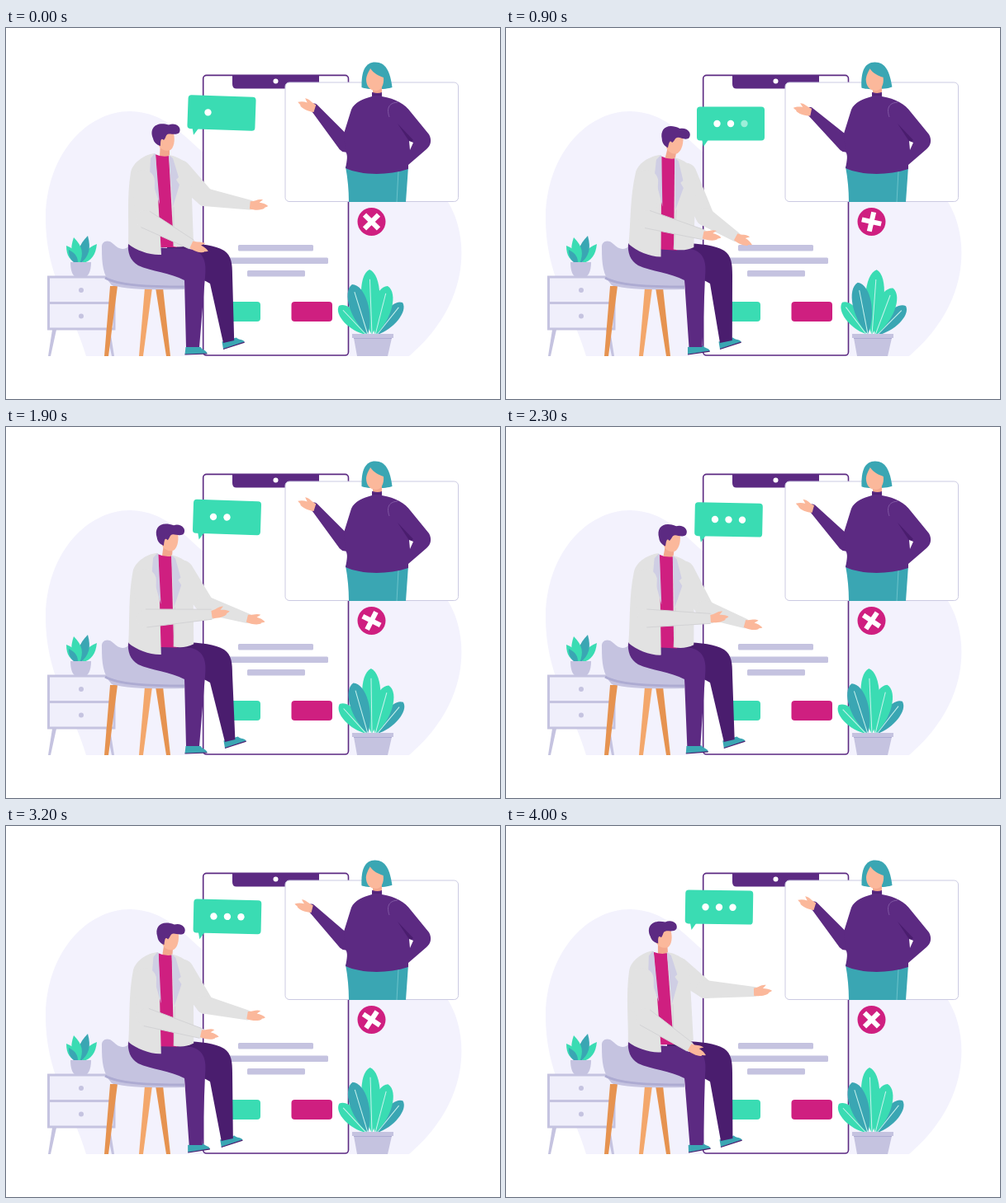
These frames come from a looping animation (598x450 px, 4.1 s). An HTML page with a canvas:

```html
<!DOCTYPE html>
<html lang="en">
<head>
<meta charset="utf-8">
<title>Online consultation</title>
<style>
html, body { margin: 0; width: 598px; height: 450px; overflow: hidden; background: #fff; }
canvas { display: block; }
</style>
</head>
<body>
<canvas id="stage" width="598" height="450"></canvas>
<script>
const ctx = document.getElementById('stage').getContext('2d');
const LOOP = 4100, STEP = 100;
const C = {
  purple: '#5c2a82', dark: '#4a1d6e', teal: '#3aa6b3', green: '#3adcb3', pink: '#cf1f80',
  lilac: '#c5c3e0', pale: '#f3f2fd', coat: '#e2e2e2', seam: '#d3d3d5', skin: '#fbb89b',
  wood: '#e69350', woodLight: '#f3a76b', white: '#fff'
};

// Poses at the key times; values in between follow a smooth curve.
const KEYS = [0, 900, 1500, 1900, 2700, 3600, 4000];
const TRACKS = {
  lean: [.23, 1, .83, .57, .88, .3, 0],
  bubbleX: [261, 272, 270.5, 267.5, 271, 264, 258],
  bubbleY: [103, 116, 113.5, 109.5, 114.5, 104.5, 98.5],
  bubbleTilt: [2, 0, 1.2, 1.8, .6, 1.7, .9],
  rightX: [315, 295, 302, 311, 305, 318, 320],
  rightY: [218, 264, 254, 238, 250, 217, 202],
  leftX: [242, 258, 266, 269, 264, 247, 239],
  leftY: [272, 256, 237, 226, 243, 269, 279],
  nearFoot: [0, 3.5, 2.5, 0, 3, 4, 4.5],
  farFoot: [2, -2, 1, 4, 1, -1, -1],
  wave: [0, -6.5, -3.5, 0, -5.5, -2.5, 0],
  sway: [-2, 4.3, 1.4, -.7, -3.4, 0, -2],
  cross: [45, 13, 45, 27, 42, 28, 45]
};

function slope(v, i) {
  const a = Math.max(i - 1, 0), b = Math.min(i + 1, KEYS.length - 1);
  return (v[b] - v[a]) / (KEYS[b] - KEYS[a]);
}
function sample(v, t) {
  let i = 0;
  while (i < KEYS.length - 2 && t >= KEYS[i + 1]) i++;
  const d = KEYS[i + 1] - KEYS[i], u = (t - KEYS[i]) / d, w = 1 - u;
  return v[i] * (1 + 2 * u) * w * w + slope(v, i) * d * u * w * w
    + v[i + 1] * u * u * (3 - 2 * u) - slope(v, i + 1) * d * u * u * w;
}
const fade = (t, from, to) => Math.min(1, Math.max(0, (t - from) / (to - from)));

function fill(d, color) {
  ctx.fillStyle = color;
  ctx.fill(new Path2D(d));
}
function line(d, color, width = 1) {
  ctx.strokeStyle = color;
  ctx.lineWidth = width;
  ctx.stroke(new Path2D(d));
}
function box(x, y, w, h, r, color, border, width) {
  ctx.beginPath();
  ctx.roundRect(x, y, w, h, r);
  ctx.fillStyle = color;
  ctx.fill();
  if (!border) return;
  ctx.strokeStyle = border;
  ctx.lineWidth = width;
  ctx.stroke();
}
function dot(x, y, r, color) {
  ctx.beginPath();
  ctx.arc(x, y, r, 0, 7);
  ctx.fillStyle = color;
  ctx.fill();
}
function turned(x, y, degrees, draw) {
  ctx.save();
  ctx.translate(x, y);
  ctx.rotate(degrees * Math.PI / 180);
  draw();
  ctx.restore();
}
const pivot = (x, y, degrees, draw) =>
  turned(x, y, degrees, () => { ctx.translate(-x, -y); draw(); });

// Tapered limb with round ends.
function limb(x1, y1, r1, x2, y2, r2, color) {
  const a = Math.atan2(y2 - y1, x2 - x1), q = Math.PI / 2;
  ctx.beginPath();
  ctx.arc(x1, y1, r1, a + q, a - q);
  ctx.arc(x2, y2, r2, a - q, a + q);
  ctx.closePath();
  ctx.fillStyle = color;
  ctx.fill();
}
// "full" sets how far towards the tip the leaf stays wide.
function leaf(x, y, tipX, tipY, w, color, full, vein) {
  const len = Math.hypot(tipX - x, tipY - y);
  const angle = Math.atan2(tipX - x, y - tipY) * 180 / Math.PI;
  turned(x, y, angle, () => {
    const top = -len * full, low = -len * .35;
    fill(`M0 0C${-w} ${low} ${-w} ${top} 0 ${-len}C${w} ${top} ${w} ${low} 0 0`, color);
    if (vein) line(`M0 0V${-len * .85}`, '#c9f3ee', 1);
  });
}
function hand(x, y, angle, flip = 1) {
  turned(x, y, angle, () => {
    ctx.scale(1, flip);
    fill('M-2 -4.500C4 -5 7 -9 13 -8L9 -4C13 -4 17 -3 20 -1C18 1 15 1 16 2C13 5 4 6 -2 4.500Z', C.skin);
  });
}
function shoe(x, y, angle) {
  turned(x, y, angle, () => {
    fill('M0 0L1 -9L19 -9C21 -5 27 -5 27 -1L0 0Z', C.teal);
    line('M0 0L27 -1', C.dark, 1.2);
  });
}

function backdrop() {
  fill('M97 398C80 340 47 300 48 228C50 150 100 101 150 101C205 102 225 150 265 168C330 195 500 165 535 211C562 255 562 335 488 398Z', C.pale);
  box(238.7, 57.4, 175.8, 339.6, 4, C.white, C.purple, 1.6);
  fill('M274 57H379V68Q379 73.500 374 73.500H279Q274 73.500 274 68Z', C.purple);
  dot(326.5, 64.5, 3, C.white);
  box(281, 263, 91, 7.5, 1.5, C.lilac);
  box(262, 278.5, 128, 7.5, 1.5, C.lilac);
  box(292, 294, 70, 7.5, 1.5, C.lilac);
  box(258, 332, 50, 24, 4, C.green);
  box(345.5, 332, 49.5, 24, 4, C.pink);
}

function furniture() {
  fill('M56 366H61L54 398H51ZM121 366H126L131 398H128Z', C.lilac);
  box(51.5, 302, 79.5, 63, 0, '#f0effb', C.lilac, 3);
  line('M51 333.500H131', C.lilac, 3);
  dot(91, 318, 3, C.lilac);
  dot(91, 349.5, 3, C.lilac);
  leaf(92, 286, 110, 262, 7, C.green, .6);
  leaf(88, 286, 73, 264, 7, C.green, .6);
  leaf(90, 286, 99, 252, 8, C.teal, .6);
  leaf(89, 286, 82, 254, 8, C.green, .6);
  leaf(87, 287, 76, 269, 5, C.teal, .6);
  fill('M78 284H103C103 296 99 302 95 302H86C81 302 78 295 78 284Z', C.lilac);

  fill('M168 315H177L166 398H161Z', C.woodLight);
  fill('M126 313H135L124 398H119ZM181 315H190L199 398H194Z', C.wood);
  fill('M116 267C115 258 124 256 130 262C137 269 143 270 150 264L216 295V317C180 318 145 317 128 312C117 300 116 285 116 267Z', C.lilac);
  line('M120 303C135 312 170 314 216 314', '#adabd2', 3);
}

function woman(p) {
  box(338, 66, 209.5, 144.5, 5, C.white, '#cbcae2', 1);
  fill('M412 168H487L484 211H415Q415 190 411 168Z', C.teal);
  line('M475 174L473 211', '#6cc3cb', 1);
  pivot(411, 141, p.wave, () => {
    limb(411, 141, 9.5, 373, 96.5, 5, C.purple);
    hand(372, 97, 198, -1);
  });
  fill('M443 78H455V83C472 86 483 92 490 102L512 129C516 136 514 143 509 147L487 166V171C460 180 428 178 411 170C413 160 414 154 411 150L409 128L418 99C422 90 432 86 443 83Z', C.purple);
  fill('M474 116L493 136L489 139Z', C.dark);
  fill('M488 137L493 139L489 148Z', C.white);
  line('M474 90C462 91 461 99 464 108', '#8a62ab', .8);
  line('M443 81H455', C.dark, 1);

  pivot(449, 76, p.wave * .2, () => {
    fill('M430.500 72C430 52 435 41.500 447 41.500C460 41.500 465 53 467.500 72C460 75 437 75 430.500 72Z', C.teal);
    fill('M444 65H455V78Q450 80 444 78Z', '#f3a78d');
    fill('M436 62C437 55 440 52 441 49C445 55 451 58 457 60C458 69 454 76 448 76C440 76 436 70 436 62Z', C.skin);
  });
}

function closeButton(p) {
  dot(442.5, 235, 17, C.pink);
  turned(442.5, 235, p.cross, () => line('M-12 0H12M0 -12V12', C.white, 6));
}

function plant(p) {
  pivot(443, 372, p.sway + 2, () => {
    leaf(443, 372, 440, 293, 15, C.green, .92, true);
    leaf(449, 372, 480, 333, 12, C.teal, .92, true);
    leaf(447, 372, 462, 313, 15, C.green, .92, true);
    leaf(436, 372, 403, 337, 12, C.green, .92, true);
    leaf(438, 372, 419, 311, 15, C.teal, .92, true);
  });
  fill('M419 371H469V376H467L462 398H425L421 376H419Z', C.lilac);
  line('M421 376.500H467', '#adabd2', 1);
}

function bubble(p, t) {
  const second = t < 1600 ? fade(t, 200, 500) : fade(t, 1700, 1850);
  const third = t < 1600 ? fade(t, 750, 1050) * (1 - .35 * fade(t, 1300, 1500)) : fade(t, 2000, 2200);
  turned(p.bubbleX, p.bubbleY, p.bubbleTilt, () => {
    fill('M-35 18H-26L-33 28Z', C.green);
    box(-41, -20.5, 82, 41, 4, C.green);
    [1, second, third].forEach((alpha, i) => {
      ctx.globalAlpha = alpha;
      dot((i - 1) * 16.5, 0, 4.2, C.white);
    });
  });
}

function legs(p) {
  const f = p.farFoot, n = p.nearFoot;
  shoe(261 + f, 389.5, -16);
  fill(`M195 262C225 260 250 262 264 270C273 276 274 286 274 300L${275 + f * .6} 379L${261 + f} 382L247 310C235 302 215 300 195 296Z`, C.dark);
  shoe(216.5 + n, 396, -n * 1.8);
  fill(`M148 261C165 268 200 266 224 268C240 272 243 284 241 302L${234 + n} 387H${218 + n}L216 306C200 297 175 295 160 288C150 282 147 272 148 261Z`, C.purple);
}

function arm(shoulder, elbow, x, y, wrist) {
  const a = Math.atan2(y - elbow[1], x - elbow[0]);
  const wx = x - 20 * Math.cos(a), wy = y - 20 * Math.sin(a);
  limb(...shoulder, 14, ...elbow, 11, C.coat);
  limb(...elbow, 11, wx, wy, wrist, C.coat);
  hand(wx + 2 * Math.cos(a), wy + 2 * Math.sin(a), a * 180 / Math.PI - 4);
  return [a, wx, wy];
}

function man(p) {
  const lean = p.lean - .23, tilt = lean * 4.7, shift = lean * 9;
  legs(p);
  arm([210 + shift, 174 + shift * .5], [241, 198 + 31 * p.lean], p.rightX, p.rightY, 6);

  pivot(186, 270, tilt, () => {
    ctx.translate(0, lean * 3);
    pivot(191, 152, tilt * 1.9, () => {
      fill('M187 138H198V155Q192 160 186 155Z', '#f3a78d');
      fill('M185 130C190 124 199 125 203 128C205 137 203 145 199 148C194 150 188 148 185 143Z', C.skin);
      fill('M178 134C173 122 181 113 197 117.500C205 114 213 120 210 126.500C207 130.500 200 128 197 128.500C193 129 194 133 191 136C188 133 187 135 187 143C183 142 179 139 178 134Z', C.purple);
    });
    fill('M180 153Q189 157 198 155L207 266H187Z', C.pink);
    fill('M179 152C168 154 154 162 151 175C146 205 149 235 148 262C158 270 175 276 188 275L181 153Z', C.coat);
    fill('M197 154C210 156 222 164 224 178L227 261Q216 267 203 265L197 154Z', C.coat);
    fill('M180 152L175 158L174 178L179 182L177 186L186 214L181 153Z', '#cfcee4');
    fill('M197 154L202 158L209 181L206 184L210 190L202 217L197 154Z', '#cfcee4');
    line('M203 217V265', C.seam);
  });

  const elbow = [168 + 3 * p.lean, 232];
  const [a, wx, wy] = arm([166 + shift * .6, 186], elbow, p.leftX, p.leftY, 6);
  const dx = Math.sin(a), dy = Math.cos(a);
  for (const side of [-1, 1]) {
    line(`M${elbow[0] + side * dx * 11} ${elbow[1] - side * dy * 11}L${wx + side * dx * 6} ${wy - side * dy * 6}`, C.seam);
  }
}

function frame(now) {
  const t = Math.floor(now % LOOP / STEP) * STEP;
  const p = {};
  for (const name in TRACKS) p[name] = sample(TRACKS[name], t);
  ctx.fillStyle = C.white;
  ctx.fillRect(0, 0, 598, 450);
  backdrop();
  furniture();
  woman(p);
  closeButton(p);
  plant(p);
  bubble(p, t);
  man(p);
  requestAnimationFrame(frame);
}
requestAnimationFrame(frame);
</script>
</body>
</html>
```
